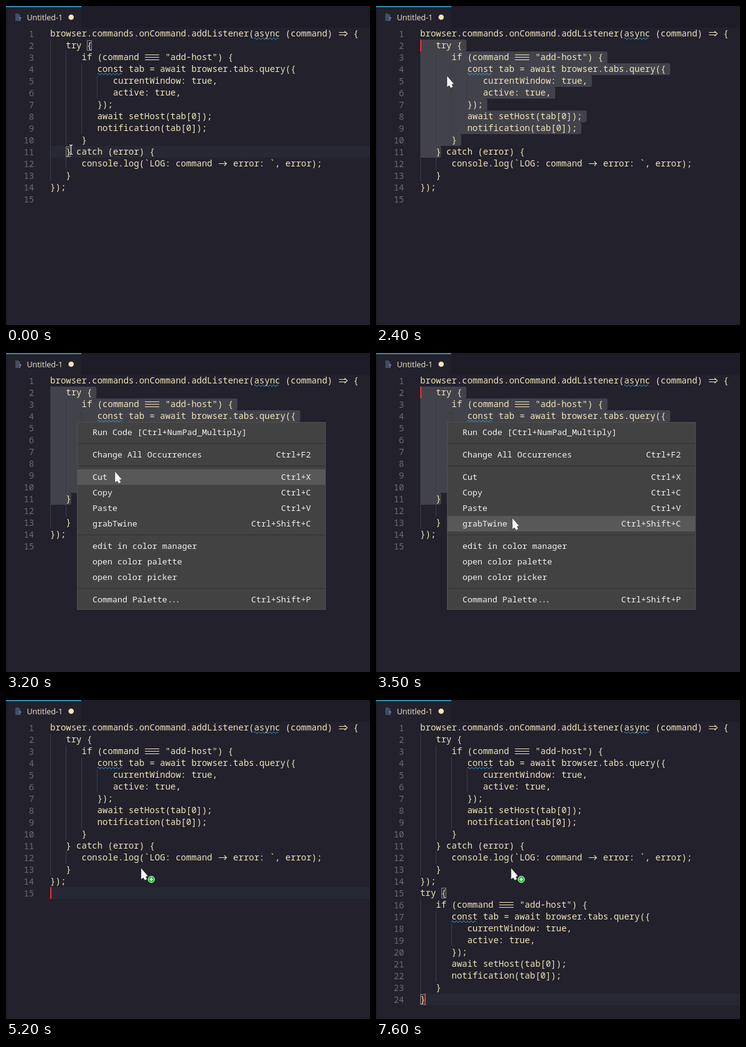
Recreate the animation shown at these times as an HTML page. Size 585 px wide and 513 px high, loop 8000 ms.

```html
<!DOCTYPE html>
<html lang="en">
<head>
<meta charset="utf-8">
<title>Code editor</title>
<style>
  html, body { margin: 0; width: 100%; height: 100%; overflow: hidden; background: #22212c; }
  svg { display: block; width: 585px; height: 513px; }
  text { white-space: pre; }
  .code, .num, .menu { font-family: "Noto Sans Mono", "DejaVu Sans Mono", monospace; }
  .code { font-size: 14px; fill: #f1e4b9; }
  .num { font-size: 14px; fill: #6c6b74; text-anchor: end; }
  .menu { font-size: 13.333px; fill: #f2f2f2; }
  .end { text-anchor: end; }
  .tab { font: 12.5px "Open Sans", "Noto Sans", sans-serif; fill: #f3e9c6; }
  .stroke { fill: none; stroke: #f1e4b9; stroke-width: 1.1; }
  .wave { fill: none; stroke: #459fd8; stroke-width: 1; }
  .guide { fill: #3c3b46; }
  .fold { fill: none; stroke: #c9c8cc; stroke-width: 1.3; }
  .match { fill: #ffffff0c; stroke: #85847f; }
</style>
</head>
<body>
<svg id="stage" viewBox="0 0 585 513" xmlns="http://www.w3.org/2000/svg"></svg>
<script>
const LOOP = 8000, LEFT = 71.1, TOP = 35, ROW = 19, CH = 8.4;
const ANCHOR = 11;

const code = [
  'browser.commands.onCommand.addListener(async (command) => {',
  '   try {',
  '      if (command === "add-host") {',
  '         const tab = await browser.tabs.query({',
  '            currentWindow: true,',
  '            active: true,',
  '         });',
  '         await setHost(tab[0]);',
  '         notification(tab[0]);',
  '      }',
  '   } catch (error) {',
  '      console.log(`LOG: command -> error: `, error);',
  '   }',
  '});',
  ''
];
const pasted = code.slice(1, 10).map(s => s.slice(3)).concat('}');

const menuItems = [
  [127, 'Run Code [Ctrl+NumPad_Multiply]', ''],
  [163, 'Change All Occurrences', 'Ctrl+F2'],
  [199, 'Cut', 'Ctrl+X'],
  [224, 'Copy', 'Ctrl+C'],
  [249, 'Paste', 'Ctrl+V'],
  [274, 'grabTwine', 'Ctrl+Shift+C'],
  [310, 'edit in color manager', ''],
  [335, 'open color palette', ''],
  [360, 'open color picker', ''],
  [396, 'Command Palette', 'Ctrl+Shift+P']
];

// Step tables: [time, values...]
const pointerSteps = [
  [0, 104.5, 231], [500, 85, 250], [600, 55, 275], [700, 32, 281], [800, 25, 235],
  [900, 25, 160], [1000, 28, 94], [1100, 26, 88], [1200, 25, 82], [1300, 24, 78],
  [1400, 24, 70], [1500, 24, 66], [1800, 30, 68], [1900, 45, 76], [2000, 66, 86],
  [2100, 86, 96], [2200, 102, 105], [2300, 111, 110], [2400, 114, 112],
  [3000, 130, 130], [3100, 150, 155], [3200, 175, 190], [3300, 200, 225],
  [3400, 212, 250], [3500, 219, 265], [3600, 218, 268], [3700, 217, 270]
];
const caretSteps = [
  [0, 0], [200, 1], [1900, 0], [2400, 1], [3000, 0], [3500, 1], [4000, 0],
  [4500, 1], [5000, 0], [5200, 1], [6800, 0], [7500, 1]
];
const badgeSteps = [[0, 0], [5000, 1], [5500, 0], [5800, 1], [6400, 0], [7600, 1]];
const menuSteps = [[0, 0], [2700, 1], [4000, .75], [4100, .5], [4200, .25], [4300, 0]];

const at = (steps, t) => steps.findLast(s => s[0] <= t).slice(1);
const colX = c => LEFT + c * CH;
const rowY = n => TOP + (n - 1) * ROW;

function add(parent, tag, attrs = {}, content) {
  const el = document.createElementNS('http://www.w3.org/2000/svg', tag);
  for (const k in attrs) el.setAttribute(k, attrs[k]);
  if (content !== undefined) el.textContent = content;
  return parent.appendChild(el);
}
const set = (el, attrs) => { for (const k in attrs) el.setAttribute(k, attrs[k]); };
const show = (el, on) => { el.style.display = on ? '' : 'none'; };
const rect = (p, x, y, width, height, more) => add(p, 'rect', { x, y, width, height, ...more });
const path = (p, d, cls) => add(p, 'path', { d, class: cls });
const group = p => add(p, 'g');

const stage = document.getElementById('stage');

function drawChrome() {
  rect(stage, 0, 0, 585, 513, { fill: '#22212c' });
  rect(stage, 121, 0, 464, 35, { fill: '#1e1d27' });
  rect(stage, 0, 0, 121, 2, { fill: '#2f8ab2' });
  rect(stage, 0, 2, 1, 511, { fill: '#1b1a23' });
  add(stage, 'path', { d: 'M15 12h5l3 3v9h-8z', fill: '#434d69' });
  add(stage, 'text', { x: 20.5, y: 24, 'font-size': 9, 'font-family': 'Noto Sans, sans-serif',
    'font-weight': 700, fill: '#7d8cae' }, '?');
  add(stage, 'text', { x: 33.4, y: 22.5, class: 'tab' }, 'Untitled-1');
  add(stage, 'circle', { cx: 104.7, cy: 18, r: 4.3, fill: '#f3e3b3' });
}

function drawLigature(g, sign, x, y) {
  const bars = (x1, x2, ys) => ys.map(dy => `M${x1} ${y + dy}H${x2}`).join('');
  if (sign === '===') path(g, bars(x + 1, x + 24, [-4, 0, 4]), 'stroke');
  else if (sign === '=>')
    path(g, bars(x + 2, x + 13, [-2, 2]) + `M${x + 11} ${y - 4}l4.5 4l-4.5 4`, 'stroke');
  else path(g, bars(x + 2, x + 14.5, [0]) + `M${x + 11} ${y - 3.5}l3.5 3.5l-3.5 3.5`, 'stroke');
}

function drawWave(g, x, y, width) {
  let d = `M${x} ${y}`;
  for (let i = 0; i < width / 3 - 1; i++) d += `q1.5 ${i % 2 ? 2.6 : -2.6} 3 0`;
  path(g, d, 'wave');
}

function drawLine(g, n, s) {
  const y = rowY(n), indent = s.search(/\S|$/);
  for (let c = 0; c < indent; c += 3) rect(g, Math.floor(colX(c)), y, 1, ROW, { class: 'guide' });
  const plain = s.replace(/===|=>|->/g, (m, i) => {
    drawLigature(g, m, colX(i), y + 9.5);
    return ' '.repeat(m.length);
  });
  add(g, 'text', { x: LEFT, y: y + 14, class: 'code' }, plain);
  for (const word of ['async', 'const']) {
    const i = s.indexOf(word);
    if (i >= 0) drawWave(g, colX(i), y + 17.5, word.length * CH);
  }
}

const drawNumber = (g, n) => add(g, 'text', { x: 45.2, y: rowY(n) + 14.5, class: 'num' }, n);

function drawMatch(cells) {
  const g = group(stage);
  for (const [n, c] of cells)
    rect(g, Math.round(colX(c)) + .5, rowY(n) + 1.5, 7, 16, { class: 'match' });
  return g;
}

function drawMenu() {
  const g = group(stage);
  rect(g, 114.5, 111.5, 399, 301, { fill: '#424242', stroke: '#505050' });
  const hover = rect(g, 115, 262, 398, 25, { fill: '#585858' });
  for (const y of [145, 181, 292, 378]) rect(g, 115, y, 398, 1, { fill: '#303030' });
  for (const [y, label, keys] of menuItems) {
    add(g, 'text', { x: 139, y: y + 5, class: 'menu' }, label);
    add(g, 'text', { x: 490, y: y + 5, class: 'menu end' }, keys);
  }
  add(g, 'text', { x: 260, y: 401, class: 'menu', 'letter-spacing': -2 }, '...');
  return { g, hover };
}

function drawPointer() {
  const g = group(stage);
  const arrow = add(g, 'path', {
    d: 'M0 0V18.5L3.6 16L6 20L9.8 18.2L8 14L11.5 13.4Z',
    fill: '#f6f6f6', stroke: '#17171d', 'stroke-width': .5
  });
  const beam = group(g);
  const line = 'M-2.5 -7.5Q0 -7.5 0 -6V6Q0 7.5 -2.5 7.5M2.5 -7.5Q0 -7.5 0 -6M0 6Q0 7.5 2.5 7.5';
  add(beam, 'path', { d: line, fill: 'none', stroke: '#111', 'stroke-width': 2.6 });
  add(beam, 'path', { d: line, fill: 'none', stroke: '#f4f4f4', 'stroke-width': 1.3 });
  const badge = group(g);
  add(badge, 'circle', { cx: 16.5, cy: 18.5, r: 5.2, fill: '#12bd35', stroke: '#e6f8e8', 'stroke-width': 1 });
  add(badge, 'path', { d: 'M13.5 18.5h6M16.5 15.5v6', stroke: '#fff', 'stroke-width': 1.6 });
  return { g, arrow, beam, badge };
}

drawChrome();
const activeRow = rect(stage, 71, 0, 514, ROW, { fill: '#262833' });

const selection = [];
for (let n = 2; n <= ANCHOR; n++) {
  const end = n === ANCHOR ? colX(4) : colX(code[n - 1].length) + 7;
  const x = Math.floor(LEFT), y = rowY(n);
  selection[n] = add(stage, 'path', {
    d: `M${x} ${y}H${end - 3}q3 0 3 3v${ROW - 6}q0 3 -3 3H${x}z`, fill: '#42424b'
  });
}

const startMatch = drawMatch([[2, 7], [11, 3]]);
const endMatch = drawMatch([[15, 4], [24, 0]]);

const base = group(stage);
code.forEach((s, i) => { drawLine(base, i + 1, s); drawNumber(base, i + 1); });
const copy = group(stage);
pasted.forEach((s, i) => {
  drawLine(copy, 15 + i, s);
  if (i) drawNumber(copy, 15 + i);
});

const folds = group(stage);
for (const n of [1, 2, 3, 4, 11]) path(folds, `M55 ${rowY(n) + 7}l5 5l5 -5`, 'fold');

const caret = rect(stage, 0, 0, 2, ROW, { fill: '#e5303c' });
const menu = drawMenu();
const pointer = drawPointer();

function render(t) {
  const [x, y] = at(pointerSteps, t);
  const selecting = t >= 800 && t < 5200;
  const first = t >= 1500 ? 2 : Math.floor((y - TOP) / ROW) + 1;
  const done = t >= 6300;

  selection.forEach((el, n) => show(el, selecting && n >= first));
  show(copy, done);
  show(startMatch, t < 800);
  show(endMatch, done);
  show(folds, t >= 500 && x < 70);

  const [line, col] = done ? [24, 1] : t >= 5200 ? [15, 0] : selecting ? [first, 0] : [ANCHOR, 4];
  show(activeRow, !selecting);
  set(activeRow, { y: rowY(line) });
  set(caret, { x: Math.floor(colX(col)) - (col ? 1 : 0), y: rowY(line) });
  show(caret, at(caretSteps, t)[0]);

  const [alpha] = at(menuSteps, t);
  show(menu.g, alpha);
  set(menu.g, { opacity: alpha });
  const item = menuItems.find(([cy]) => Math.abs(y - cy) <= 12.5);
  show(menu.hover, t >= 3000 && item);
  if (item) set(menu.hover, { y: item[0] - 12 });

  const beam = t < 800 && x > 70;
  set(pointer.g, { transform: `translate(${x} ${y})` });
  show(pointer.beam, beam);
  show(pointer.arrow, !beam);
  set(pointer.arrow, { transform: x < 70 ? 'scale(-1 1)' : '' });
  show(pointer.badge, at(badgeSteps, t)[0]);
}

const start = performance.now();
function tick() {
  render((performance.now() - start) % LOOP);
  requestAnimationFrame(tick);
}
tick();
</script>
</body>
</html>
```
